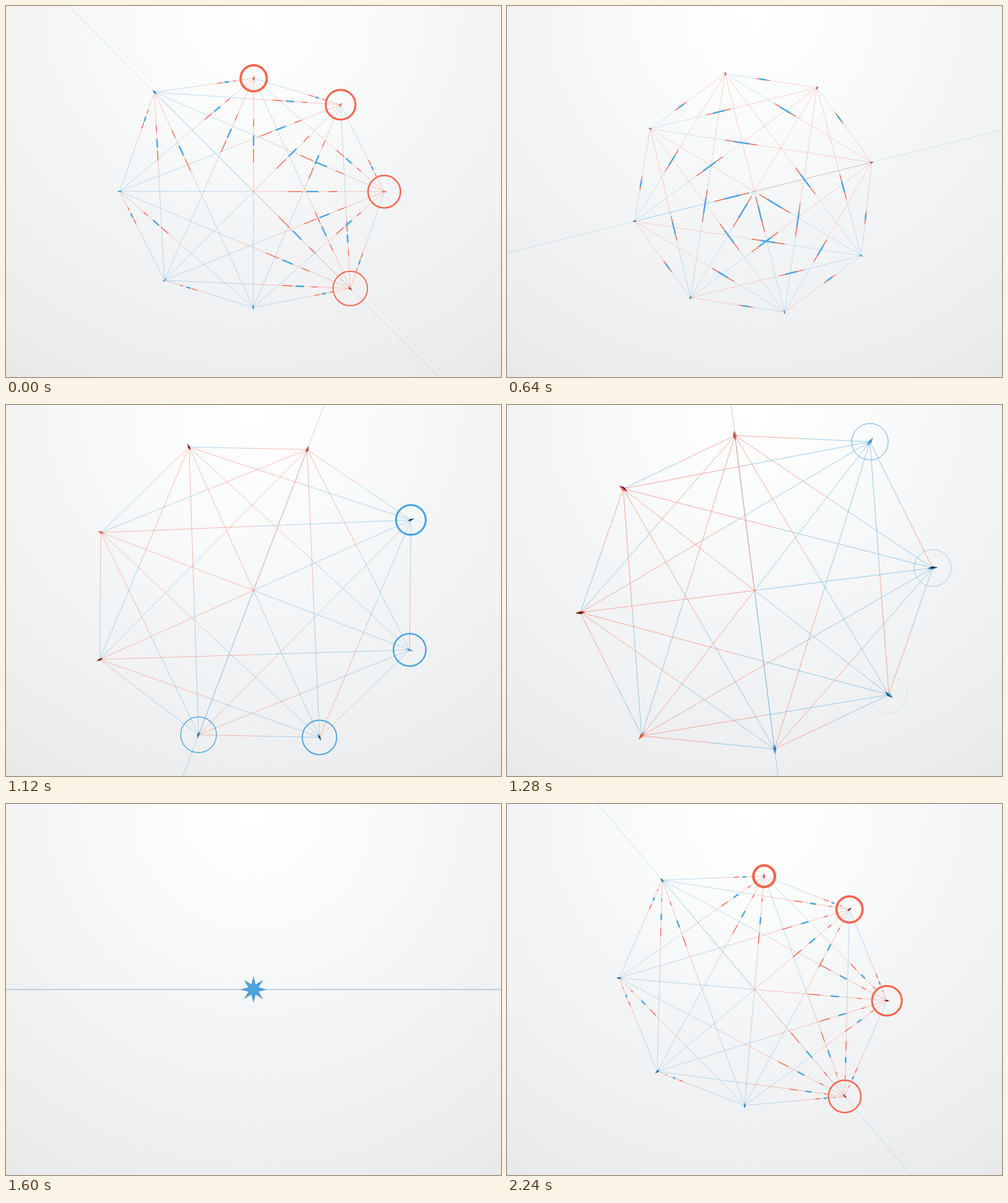
Write an HTML page that moves like this. It is 800 by 600 pixels and loops after 2280 ms.

```html
<!DOCTYPE html>
<html lang="en">
<head>
<meta charset="utf-8">
<title>Rotating network</title>
<style>
  html, body { margin: 0; width: 100%; height: 100%; overflow: hidden; background: #f3f4f5; }
  svg { display: block; width: 800px; height: 600px; }
  path, line, circle { fill: none; }
</style>
</head>
<body>
<svg id="stage" viewBox="0 0 800 600" xmlns="http://www.w3.org/2000/svg">
  <defs>
    <radialGradient id="paper" gradientUnits="userSpaceOnUse" cx="400" cy="10" r="720">
      <stop offset="0" stop-color="#ffffff"/>
      <stop offset=".25" stop-color="#fafbfb"/>
      <stop offset=".52" stop-color="#f3f4f5"/>
      <stop offset=".78" stop-color="#eeeff0"/>
      <stop offset="1" stop-color="#e7e8e9"/>
    </radialGradient>
  </defs>
  <rect width="800" height="600" fill="url(#paper)"/>
</svg>
<script>
const LOOP = 2280, STEP = 40;
const REST = 480, COLLAPSE = 1600;   // slowest moment, and all nodes at the centre
const CX = 400, CY = 300;
const RED = { light: '#f4664f', dark: '#5c1210', radius: 191, ringStart: 2000 };
const BLUE = { light: '#4aa5de', dark: '#0f3f66', radius: 195.5, ringStart: 800 };

const stage = document.getElementById('stage');
const mod = t => ((t % LOOP) + LOOP) % LOOP;
const set = (el, attrs) => { for (const k in attrs) el.setAttribute(k, attrs[k]); };

function add(tag, attrs = {}) {
  const el = document.createElementNS('http://www.w3.org/2000/svg', tag);
  set(el, attrs);
  return stage.appendChild(el);
}

const axis = add('line', { stroke: '#6fa8cc', 'stroke-opacity': .42 });
const redThreads = add('path', { stroke: RED.light });
const blueThreads = add('path', { stroke: BLUE.light });
const redDashes = add('path', { stroke: RED.light, 'stroke-width': 1.4 });
const blueDashes = add('path', { stroke: BLUE.light, 'stroke-width': 2.4 });

const nodes = [RED, BLUE].flatMap((team, side) =>
  [0, 1, 2, 3].map(k => ({ team, k, turn: side * 180 - 45 * k })));
for (const n of nodes) n.facets = [add('path'), add('path')];
for (const n of nodes) n.ring = add('circle', { stroke: n.team.light });

const pairs = nodes.flatMap((a, i) => nodes.slice(i + 1).map(b => [a, b]));

// x runs from 0 at rest to 1 at the collapse, on either side of the rest
function sceneAt(t) {
  const inward = t >= REST && t <= COLLAPSE;
  const x = inward ? (t - REST) / (COLLAPSE - REST)
                   : mod(REST - t) / (LOOP - COLLAPSE + REST);
  const swing = 180 * (.5349 * x + .4003 * x ** 3 + .0648 * x ** 5);
  return { x, inward, angle: inward ? -swing : swing, zoom: Math.exp(1.88 * x * x) };
}

function placeNode(n, scene) {
  const power = scene.inward ? 2.1 + n.k * (.1 + .14 * scene.x) : 2.08 - .245 * n.k;
  const drop = scene.x ** power;
  const r = n.team.radius * (1 - drop) * scene.zoom;
  const a = (scene.angle + n.turn) * Math.PI / 180;
  n.ux = Math.cos(a);
  n.uy = Math.sin(a);
  n.x = CX + r * n.ux;
  n.y = CY + r * n.uy;
  n.spin = 40 * drop;
}

// a four-sided spindle turning about its long axis, two facets in view
function drawNode(n, zoom) {
  const half = 3.25 * zoom, girth = half * .36;
  const at = (along, across) =>
    `${(n.x + n.ux * along - n.uy * across).toFixed(2)},${(n.y + n.uy * along + n.ux * across).toFixed(2)}`;
  const whole = Math.floor(n.spin);
  const roll = (n.spin - whole) * Math.PI / 2;
  const wide = girth * Math.sin(Math.PI / 4 + roll);
  const split = girth * Math.sin(Math.PI / 4 - roll);
  const tones = whole % 2 ? [n.team.dark, n.team.light] : [n.team.light, n.team.dark];
  [-wide, wide].forEach((edge, i) => set(n.facets[i], {
    d: `M${at(half, 0)}L${at(0, edge)}L${at(-half, 0)}L${at(0, split)}Z`,
    style: `fill:${tones[i]}`
  }));
}

function drawRing(n, t) {
  const age = mod(t - n.team.ringStart - STEP * n.k) / (12 * STEP);
  const left = Math.max(0, 1 - age);
  set(n.ring, {
    cx: n.x, cy: n.y,
    r: 30 * (1 - left ** 3),
    'stroke-width': 6.7 * left ** 1.45,
    visibility: age > 0 && age < 1 ? 'visible' : 'hidden'
  });
}

const segment = (a, b, from, to) => {
  const p = q => `${(a.x + (b.x - a.x) * q).toFixed(2)},${(a.y + (b.y - a.y) * q).toFixed(2)}`;
  return `M${p(from)}L${p(to)}`;
};
const network = (from, to) => pairs.map(([a, b]) => segment(a, b, from, to)).join('');

// pulses rush to the middle of each thread, wait, then rush to its end
function pulse(t) {
  const p = mod(t + 120);
  if (p === 0 || p >= 1000) return '';
  const offset = p < 400 ? -((1 - p / 400) ** 2.2) : p > 560 ? ((p - 560) / 440) ** 2.2 : 0;
  const mid = .5 + offset / 2, half = .041 * (1 - Math.abs(offset));
  return network(mid - half, mid + half);
}

function draw(t) {
  const scene = sceneAt(t);
  nodes.forEach(n => placeNode(n, scene));

  const a = scene.angle * Math.PI / 180;
  const dx = 600 * Math.cos(a), dy = 600 * Math.sin(a);
  set(axis, { x1: CX - dx, y1: CY - dy, x2: CX + dx, y2: CY + dy, 'stroke-width': .7 * scene.zoom ** .55 });

  const open = scene.x < 1;
  const thread = .3 * scene.zoom ** .65;
  set(redThreads, { d: open ? network(0, .5) : '', 'stroke-width': thread });
  set(blueThreads, { d: open ? network(.5, 1) : '', 'stroke-width': thread });
  set(redDashes, { d: pulse(t - STEP) + pulse(t + STEP) });
  set(blueDashes, { d: pulse(t) });

  for (const n of nodes) {
    drawNode(n, scene.zoom);
    drawRing(n, t);
  }
}

const start = performance.now();
function tick() {
  const t = Math.max(0, performance.now() - start) % LOOP;
  draw(Math.floor(t / STEP) * STEP);
  requestAnimationFrame(tick);
}
tick();
</script>
</body>
</html>
```
